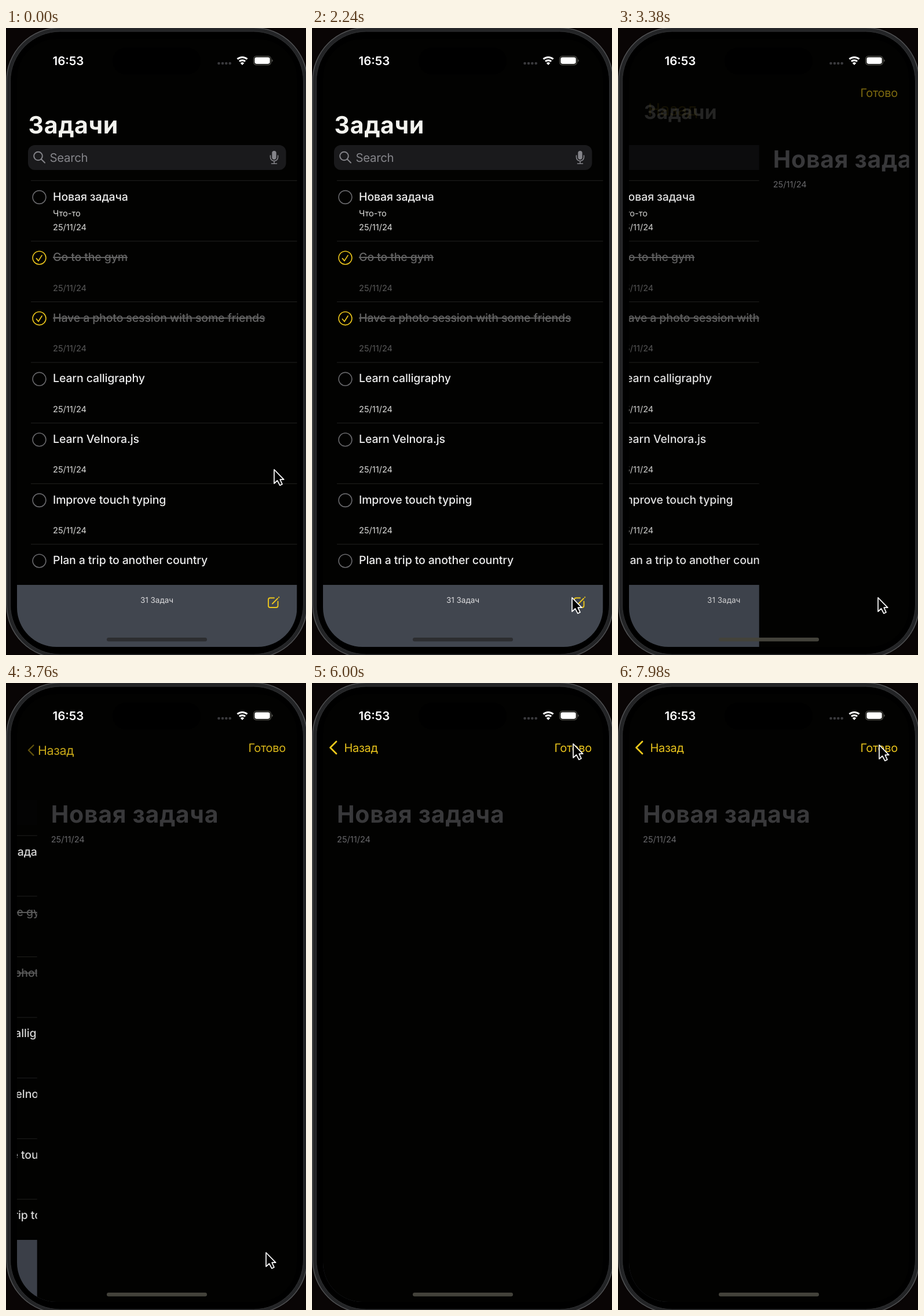
An HTML page that plays this animation: 518 px wide and 1082 px high, repeating every 8 s.

```html
<!DOCTYPE html>
<html lang="ru">
<head>
<meta charset="utf-8">
<title>Задачи</title>
<style>
  html, body { margin: 0; width: 100%; height: 100%; overflow: hidden; background: #090505; }
  svg { display: block; width: 100%; height: 100%; font-family: Inter, Roboto, sans-serif; text-rendering: geometricPrecision; }
  .line { fill: none; stroke-linecap: round; stroke-linejoin: round; }
  .gold { stroke: #ecc61c; }
  .task { font-size: 19.5px; font-weight: 500; letter-spacing: -.13px; fill: #ededed; }
  .small { font-size: 14.6px; fill: #dededc; }
  .done .task { fill: #646464; text-decoration: line-through; }
  .done .small { fill: #5a5a5a; }
  .big { font-size: 41px; font-weight: 700; letter-spacing: .7px; }
  .nav { font-size: 20px; letter-spacing: -.3px; fill: #e8c31c; }
</style>
</head>
<body>
<svg viewBox="0 0 518 1082">
  <defs>
    <clipPath id="screen"><rect x="19" y="19" width="483.5" height="1049" rx="68"/></clipPath>
  </defs>

  <!-- phone body, its right and bottom edges lie just off stage -->
  <rect x="1" y="-.5" width="519" height="1087.500" rx="92" fill="#232426" stroke="#505153" stroke-width="1.500"/>
  <rect x="7.500" y="6" width="506" height="1075" rx="86" fill="#000" stroke="#303133"/>

  <g clip-path="url(#screen)">
    <rect x="19" y="19" width="484" height="1049" fill="#020201"/>
    <g id="list">
      <g id="rows"></g>
      <rect x="19" y="961" width="483.500" height="107" fill="#41464f"/>
      <text x="260.500" y="991.500" text-anchor="middle" font-size="13.500" fill="#dcdcde">31 Задач</text>
      <g class="line gold" stroke-width="1.900">
        <path d="M463 983.500h-7a3 3 0 0 0-3 3v10.500a3 3 0 0 0 3 3h10.500a3 3 0 0 0 3-3v-7.500"/>
        <path d="M460 993.500L469 984.500M471 982.500l.3-.3"/>
      </g>
    </g>
    <g id="search">
      <rect x="38" y="202" width="445.500" height="43" rx="12" fill="#1a1a1c"/>
      <g class="line" stroke="#85858a" stroke-width="2">
        <circle cx="55.500" cy="221" r="7.300"/>
        <path d="M61 226.500l6 6"/>
        <path d="M456.500 220v3a6.500 6.500 0 0 0 13 0v-3M463 229.500v4.500M458.500 234h9" stroke-width="1.600"/>
      </g>
      <rect x="459.300" y="212" width="7.400" height="15" rx="3.700" fill="#85858a"/>
      <text x="75.500" y="231" font-size="20.400" letter-spacing="-.3" fill="#85858a">Search</text>
    </g>
    <rect id="shade" x="19" y="19" width="484" height="1049" fill="#000"/>
    <g id="note">
      <rect x="19" y="19" width="484" height="1049" fill="#020201"/>
      <text class="big" x="43" y="241" fill="#38383a">Новая задача</text>
      <text class="small" x="43" y="274.500" style="fill:#69696c">25/11/24</text>
    </g>
    <g id="title"><text class="big" y="15" fill="#f2f2ee">Задачи</text></g>
    <g id="back"><text class="nav" y="7">Назад</text></g>
    <path id="chevron" class="line" d="M5.500-10.500L-5 0 5.500 10.500" stroke="#f0ca1c" stroke-width="2.800"/>
    <text id="ready" class="nav" x="483" y="118.500" text-anchor="end">Готово</text>
    <rect id="home" x="174" y="1052" width="173" height="6.500" rx="3.200"/>
  </g>

  <!-- status bar -->
  <rect x="184" y="34" width="152" height="46" rx="23" fill="#000"/>
  <text x="80.500" y="64" font-size="20.500" font-weight="600" fill="#fff">16:53</text>
  <g fill="#3a3a3d">
    <circle cx="367.500" cy="61" r="2.300"/><circle cx="374" cy="61" r="2.300"/>
    <circle cx="380.300" cy="61" r="2.300"/><circle cx="386.700" cy="61" r="2.300"/>
  </g>
  <path d="M399.500 53.700a12.600 12.600 0 0 1 17 0M402.900 57.600a7.600 7.600 0 0 1 10.200 0" fill="none" stroke="#fff" stroke-width="3"/>
  <path d="M408 64l-3.300-3.400a4.800 4.800 0 0 1 6.600 0z" fill="#fff"/>
  <rect x="427.500" y="48.700" width="30" height="15" rx="4.800" fill="none" stroke="#55554f" stroke-width="1.200"/>
  <rect x="429.300" y="50.500" width="26.400" height="11.400" rx="3.300" fill="#fff"/>
  <path d="M459 54v4.600q1.700-.6 1.700-2.300t-1.700-2.300z" fill="#55554f"/>

  <path id="cursor" d="M0 0V24L5.500 19 10 27.300 14 25.300 10.200 17.200H16.700Z" fill="#000" stroke="#fff" stroke-width="1.700" stroke-linejoin="round"/>
</svg>
<script>
const LOOP = 8000, WIDTH = 484, PITCH = 104.6;
const PUSH_START = 3109, PUSH_RATE = 0.0066;
const el = id => document.getElementById(id);
const clamp = v => Math.max(0, Math.min(1, v));
const mix = (a, b, u) => a + (b - a) * u;
const ease = u => u * u * (3 - 2 * u);

const tasks = ['Новая задача', 'Go to the gym', 'Have a photo session with some friends',
  'Learn calligraphy', 'Learn Velnora.js', 'Improve touch typing', 'Plan a trip to another country'];

el('rows').innerHTML = tasks.map((name, i) => {
  const done = i === 1 || i === 2;
  return `<g class="${done ? 'done' : ''}" transform="translate(0 ${i * PITCH})">
    <path d="M43 263.300H503" stroke="#222220"/>
    <circle cx="57.500" cy="292" r="11.400" class="line ${done ? 'gold' : ''}" stroke="#68686b" stroke-width="1.600"/>
    ${done ? '<path class="line gold" d="M52.500 293l3.500 4.300 6-9.500" stroke-width="1.700"/>' : ''}
    <text class="task" x="81" y="297.700">${name}</text>
    ${i ? '' : '<text class="small" x="81" y="325">Что-то</text>'}
    <text class="small" x="81" y="349">25/11/24</text></g>`;
}).join('');

// pointer stops: time, x, y, sideways bow of the path leading there
const stops = [[0, 463, 762, 0], [300, 463, 762, 0], [1420, 449, 983, 0], [4250, 449, 983, 0],
  [5490, 451, 105, -15], [6200, 451, 105, 0], [7000, 451, 107, 0], [LOOP, 451, 107, 0]];

function pointer(t) {
  const i = stops.findIndex(s => s[0] > t);
  const [a, b] = [stops[i - 1], stops[i]];
  const u = ease((t - a[0]) / (b[0] - a[0]));
  return [mix(a[1], b[1], u) + b[3] * Math.sin(Math.PI * u), mix(a[2], b[2], u)];
}

function place(id, x, y = 0, scale = 1, opacity = 1) {
  el(id).setAttribute('transform', `translate(${x} ${y}) scale(${scale})`);
  el(id).setAttribute('opacity', clamp(opacity));
}

// critically damped spring that snaps to its end
function push(t) {
  const s = Math.max(0, t - PUSH_START) * PUSH_RATE;
  const rest = (1 + s) * Math.exp(-s);
  return rest < .001 ? 1 : 1 - rest;
}

function draw(t) {
  const p = push(t), rest = 1 - p;
  const late = clamp(p * 2 - 1);
  place('list', -0.3 * WIDTH * p);   // slides slower than the note
  place('search', -333 * p, 0, 1, rest);
  place('note', WIDTH * rest);
  place('title', mix(38.5, 50, p), mix(167, 125, p), mix(1, .65, p), 1 - 1.6 * p);
  place('back', mix(47, 55.5, p), mix(175, 111.5, p), mix(2, 1, p), late);
  place('chevron', 36.5 + 90 * rest, mix(175, 111.5, p), clamp(1 - 2.6 * rest), late ** 6);
  el('ready').setAttribute('opacity', p);
  el('shade').setAttribute('opacity', .1 * p);
  el('home').setAttribute('fill', p < .5 ? '#2c2d30' : '#43423a');
  place('cursor', ...pointer(t));
}

function tick() {
  draw(performance.now() % LOOP);
  requestAnimationFrame(tick);
}
tick();
</script>
</body>
</html>
```
